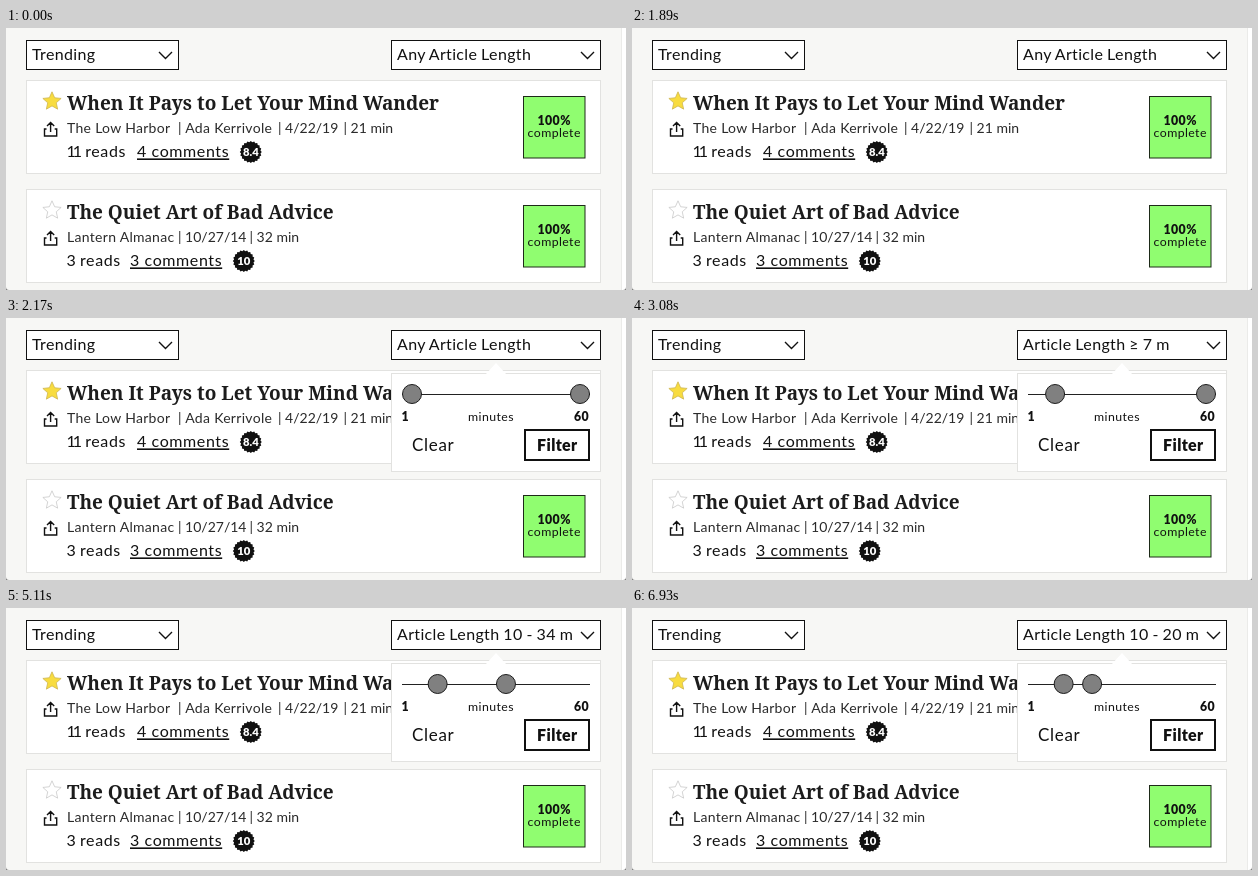
These frames come from a looping animation (620x262 px, 8 s). An HTML page:

```html
<!DOCTYPE html>
<html lang="en">
<head>
<meta charset="utf-8">
<title>Article length filter</title>
<style>
html, body { margin: 0; width: 100%; height: 100%; overflow: hidden; background: #f7f7f5; }
svg { display: block; width: 620px; height: 262px; }
text { font-family: Lato, "Open Sans", sans-serif; fill: #111; white-space: pre; }
.ui { font-size: 16px; letter-spacing: .35px; word-spacing: -.6px; }
.title { font: 700 19px "Noto Serif", serif; fill: #1c1c1c; }
.meta { font-size: 14px; fill: #2a2a2a; }
.name { letter-spacing: .3px; }
.stat { font-size: 16px; letter-spacing: .6px; }
.tight { letter-spacing: -3px; }
.link { text-decoration: underline; text-decoration-thickness: 1px; }
.small { font-size: 12.3px; letter-spacing: .4px; }
.heavy { font-weight: 900; }
.mid { text-anchor: middle; }
.badge { font-size: 11.3px; font-weight: 900; fill: #fff; }
.clear { font-size: 17px; letter-spacing: .7px; }
.line { fill: none; stroke: #111; stroke-width: 1.4; }
.field { fill: #fff; stroke: #111; }
.card { fill: #fff; stroke: #e2e2e0; }
.done { fill: #90fd70; stroke: #1d2a18; }
.knob { fill: #808080; stroke: #1c1c1c; }
</style>
</head>
<body>
<svg id="stage" viewBox="0 0 620 262"></svg>
<script>
const LOOP = 8000, STEP = 70;
const stage = document.getElementById('stage');

const text = (x, y, cls, s) => `<text x="${x}" y="${y}" class="${cls}">${s}</text>`;
const rect = (x, y, w, h, cls) => `<rect x="${x}" y="${y}" width="${w}" height="${h}" class="${cls}"/>`;

// Closed outline alternating between two radii
function spiky(cx, cy, n, outer, inner) {
  const pts = [];
  for (let i = 0; i < 2 * n; i++) {
    const r = i % 2 ? inner : outer, a = Math.PI * i / n - Math.PI / 2;
    pts.push((cx + r * Math.cos(a)).toFixed(2) + ',' + (cy + r * Math.sin(a)).toFixed(2));
  }
  return pts.join(' ');
}

const select = (x, w, id, label) =>
  rect(x + .5, 12.5, w - 1, 29, 'field') +
  `<text x="${x + 6}" y="32" class="ui" id="${id}">${label}</text>` +
  `<path class="line" d="M${x + w - 20} 24l6.5 6.5l6.5 -6.5"/>`;

function card(c) {
  const [bx, score] = c.badge;
  const star = c.starred ? 'fill="#f8dc3f" stroke="#cdb552"' : 'fill="#fff" stroke="#c9c9c9"';
  return `<g transform="translate(0 ${c.y})">` +
    rect(20.5, .5, 574, 93, 'card') +
    `<polygon points="${spiky(46, 21.4, 5, 9.6, 4.5)}" ${star} stroke-width=".8" stroke-linejoin="round"/>` +
    '<path class="line" d="M41 46l3.6 -3.6l3.6 3.6M44.6 42.8V52M40.5 49H38.5V56H50.7V49H48.7"/>' +
    text(61, 30, 'title', c.title) +
    c.meta.map(([x, s, cls]) => text(x, 53, 'meta ' + (cls || ''), s)).join('') +
    text(c.reads[0], 77.4, 'stat tight', c.reads[1]) +
    text(c.reads[2], 77.4, 'stat', 'reads') +
    text(c.comments[0], 77.4, 'stat link', c.comments[1] + ' comments') +
    `<polygon points="${spiky(bx, 72, 20, 11, 9.8)}" fill="#111"/>` +
    text(bx, 76, 'badge mid', score) +
    rect(517.5, 16.5, 61.5, 61.5, 'done') +
    text(548.2, 44.6, 'small heavy mid', '100%') +
    text(548.2, 57.4, 'small mid', 'complete') + '</g>';
}

const cards = [
  { y: 52, starred: true, title: 'When It Pays to Let Your Mind Wander',
    meta: [[61, 'The Low Harbor', 'name'], [172, '| Ada Kerrivole', 'name'], [272, '| 4/22/19'], [337.5, '| 21 min']],
    reads: [60.5, '11', 79.2], comments: [131, 4], badge: [244.8, '8.4'] },
  { y: 161, starred: false, title: 'The Quiet Art of Bad Advice',
    meta: [[61, 'Lantern Almanac', 'name'], [172, '| 10/27/14'], [243.5, '| 32 min']],
    reads: [60.5, '3', 74], comments: [124, 3], badge: [237.8, '10'] }
];

const popup = '<g id="popup">' +
  rect(385.5, 55.5, 209, 98, 'card') +
  '<path d="M479.5 56.5L490 45L500.5 56.5Z" fill="#fff"/>' +
  '<path d="M396 76.5H584" stroke="#222"/>' +
  '<circle id="low" class="knob" cy="76" r="9.5"/><circle id="high" class="knob" cy="76" r="9.5"/>' +
  text(395.5, 103, 'small heavy', '1') + text(485, 103, 'small mid', 'minutes') +
  text(568, 103, 'small heavy', '60') +
  text(406, 133, 'clear', 'Clear') +
  '<rect x="519" y="112" width="64" height="30" fill="#fff" stroke="#111" stroke-width="2"/>' +
  text(551.3, 133, 'ui heavy mid', 'Filter') + '</g>';

stage.innerHTML =
  '<rect width="620" height="262" fill="#f7f7f5"/><rect x="616" width="4" height="262" fill="#fff"/>' +
  '<path d="M615.5 0V262" stroke="#ebebe9"/>' +
  select(20, 153, 'sort', 'Trending') + select(385, 210, 'range', 'Any Article Length') +
  cards.map(card).join('') + popup +
  '<path d="M0 259Q0 262 3 262H0ZM620 259Q620 262 617 262H620Z" fill="#777"/>';

// [start time, values one step apart]
const fade = [[0, 0], [1960, .35, .7, .93, 1]];
const lows = [[0, 1], [2730, 2, 3, 4, 5, 6, 7], [3220, 8, 9], [3500, 10]];
const highs = [[0, 60], [4620, 58, 56, 53, 49, 45, 41, 37, 34, 32, 31, 30, 29, 28, 27, 26, 25],
  [6020, 24], [6160, 23], [6370, 22], [6580, 21], [6930, 20]];

function valueAt(runs, t) {
  const [start, ...vals] = runs.filter(r => r[0] <= t).pop();
  return vals[Math.min(vals.length - 1, Math.floor((t - start) / STEP))];
}

const $ = id => document.getElementById(id);
const el = { popup: $('popup'), low: $('low'), high: $('high'), range: $('range') };
const knobX = min => 406 + (min - 1) * 168 / 59;

function label(lo, hi) {
  if (hi < 60) return `Article Length ${lo} - ${hi} m`;
  return lo > 1 ? `Article Length ≥ ${lo} m` : 'Any Article Length';
}

function draw(t) {
  const lo = valueAt(lows, t), hi = valueAt(highs, t);
  el.popup.setAttribute('opacity', valueAt(fade, t));
  el.low.setAttribute('cx', knobX(lo));
  el.high.setAttribute('cx', knobX(hi));
  const s = label(lo, hi);
  if (el.range.textContent !== s) el.range.textContent = s;
}

const begin = performance.now();
function tick() {
  draw((performance.now() - begin) % LOOP);
  requestAnimationFrame(tick);
}
tick();
</script>
</body>
</html>
```
